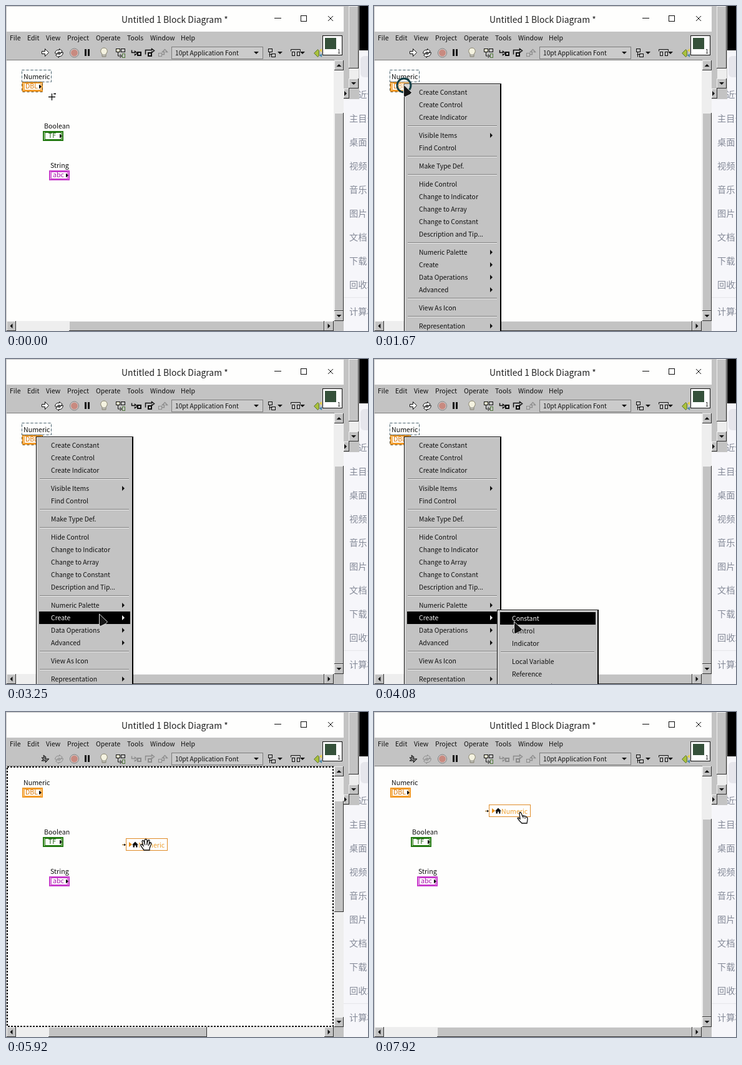
Write an HTML page with a canvas that moves like this. It is 580 by 520 pixels and loops after 8 s.

```html
<!DOCTYPE html>
<html lang="en">
<head>
<meta charset="utf-8">
<title>Block diagram demo</title>
<style>
html, body { margin: 0; width: 100%; height: 100%; overflow: hidden; background: #fefefd; }
canvas { display: block; }
</style>
</head>
<body>
<canvas id="stage" width="580" height="520"></canvas>
<script>
const ctx = document.getElementById('stage').getContext('2d');
const LOOP = 8000, STEP = 1000 / 12;
const PAPER = '#fefefd', FACE = '#c3c3c3', LIGHT = '#f0f0f0', TRACK = '#eeeeee';
const SHADE = '#7c7c7c', INK = '#101010', FADED = '#8c8c8c';
const SANS = '"Noto Sans CJK SC", "Noto Sans CJK", "Noto Sans", sans-serif';

// Moments at which the scene changes
const MENU_OPEN = 1500, SUBMENU_OPEN = 3420, PICKED = 5080, DROPPED = 6420;
const CLICKS = [1420, PICKED, DROPPED];

// Cursor path: time, x, y
const ROUTE = [
  [300, 73, 145], [1250, 48, 127], [1750, 48, 127], [2500, 143, 234], [2600, 143, 234],
  [3330, 150, 415], [3500, 150, 415], [4080, 225, 421], [4250, 225, 421], [4920, 261, 484],
  [5250, 261, 484], [6150, 217, 158], [6700, 217, 158], [7450, 226, 193], [7900, 235, 157]
];

const MENU = ['Create Constant', 'Create Control', 'Create Indicator', '-', 'Visible Items>', 'Find Control', '-',
  'Make Type Def.', '-', 'Hide Control', 'Change to Indicator', 'Change to Array', 'Change to Constant',
  'Description and Tip...', '-', 'Numeric Palette>', 'Create>', 'Data Operations>', 'Advanced>', '-',
  'View As Icon', '-', 'Representation>', 'Data Type'];
const SUBMENU = ['Constant', 'Control', 'Indicator', '-', 'Local Variable', 'Reference', 'Property Node>'];

function box(x, y, w, h, color) {
  ctx.fillStyle = color;
  ctx.fillRect(x, y, w, h);
}

function frame(x, y, w, h, color, line = 1) {
  ctx.strokeStyle = color;
  ctx.lineWidth = line;
  ctx.strokeRect(x + line / 2, y + line / 2, w - line, h - line);
}

function text(s, x, y, size = 10.4, color = INK, font = SANS) {
  ctx.font = `${size}px ${font}`;
  ctx.fillStyle = color;
  ctx.fillText(s, x, y);
}

function shape(d, x, y, fill, stroke, line = 1) {
  const path = new Path2D(d);
  ctx.save();
  ctx.translate(x, y);
  if (fill) { ctx.fillStyle = fill; ctx.fill(path); }
  if (stroke) { ctx.strokeStyle = stroke; ctx.lineWidth = line; ctx.stroke(path); }
  ctx.restore();
}

function circle(x, y, r, fill, stroke, line) {
  shape(`M${r} 0A${r} ${r} 0 1 1 ${-r} 0A${r} ${r} 0 1 1 ${r} 0Z`, x, y, fill, stroke, line);
}

function dashed(x, y, w, h, color, pattern, line = 1) {
  ctx.save();
  ctx.setLineDash(pattern);
  frame(x, y, w, h, color, line);
  ctx.restore();
}

function raised(x, y, w, h) {
  box(x, y, w, h, FACE);
  box(x, y, w, 1, LIGHT);
  box(x, y, 1, h, LIGHT);
  box(x, y + h - 1, w, 1, '#303030');
  box(x + w - 1, y, 1, h, '#303030');
}

const TRIANGLES = {
  up: 'M-4 2L0 -2L4 2Z', down: 'M-4 -2L0 2L4 -2Z', left: 'M2 -4L-2 0L2 4Z', right: 'M-2 -4L2 0L-2 4Z'
};

function arrowButton(x, y, dir, size = 15) {
  raised(x, y, size, 16);
  shape(TRIANGLES[dir], x + size / 2, y + 8, INK);
}

function desktop() {
  box(0, 0, 580, 520, PAPER);
  box(541, 0, 39, 520, '#f6f6fa');
  ['最近使用', '主目录', '桌面', '视频', '音乐', '图片', '文档', '下载', '回收站', '计算机'].forEach((s, i) =>
    text(s, 550, i < 9 ? 147 + i * 38 : 494, 14.2, '#858a98'));
  box(541, 466, 39, 1, '#e6e6ea');
  box(566, 0, 14, 71, '#000');
  ctx.fillStyle = '#e6e6ec';
  ctx.beginPath();
  ctx.roundRect(568, 80, 30, 34, 6);
  ctx.fill();
  // Corner of a window further back
  box(541, 0, 25, 149, FACE);
  raised(549, 0, 16, 100);
  box(550, 100, 15, 16, TRACK);
  arrowButton(549, 116, 'down', 16);
  raised(541, 132, 9, 16);
  shape(TRIANGLES.right, 544, 140, INK);
}

function windowChrome(broken) {
  box(0, 0, 541, 520, PAPER);
  box(0, 0, 541, 1, '#c4c4c4');
  box(0, 0, 1, 520, '#c4c4c4');
  text('Untitled 1 Block Diagram *', 185, 27, 13.9, '#202020');
  box(430, 19, 11, 1, INK);
  frame(472, 15, 10, 10, INK);
  shape('M0 0L8 8M8 0L0 8', 516, 16, null, INK);

  box(1, 41, 540, 46, FACE);
  box(1, 86, 525, 1, SHADE);
  [['File', 6], ['Edit', 34], ['View', 64], ['Project', 98], ['Operate', 144], ['Tools', 194], ['Window', 231], ['Help', 280]]
    .forEach(([s, x]) => text(s, x, 55, 10.5));
  toolbar(broken);
}

function toolbar(broken) {
  const live = broken ? FADED : INK;
  const cell = broken ? FACE : PAPER;
  if (broken) {
    shape('M0 4H4L3 0L7 3L6 6L12 6L6 12L7 9H0L3 7Z', 57, 69, '#808080', INK);
  } else {
    shape('M0 4H5V0L11 6L5 12V8H0Z', 57.5, 68.5, PAPER, INK);
  }
  shape('M0 6Q1 0 7 1V-1L12 3L7 6V4Q4 4 3 7Z', 78.5, 69.5, cell, live);
  shape('M13 5Q12 12 6 11V13L1 9L6 6V8Q9 8 10 5Z', 78.5, 69.5, cell, live);
  circle(109.5, 75, 7, '#d8d0d0', SHADE);
  circle(109.5, 75, 5.5, '#c88a80');
  box(126, 69, 3, 11, INK);
  box(131, 69, 3, 11, INK);
  shape('M-3 5Q-3 3 -5 1A5.3 5.3 0 1 1 5 1Q3 3 3 5V8H-3Z', 157, 73, '#f4f2e0', '#8a8670');
  shape('M-3 5H3M-3 7H3', 157, 73, null, SHADE);

  frame(176, 68, 7, 6, INK);
  frame(184, 68, 7, 6, INK);
  box(177, 69, 5, 4, '#f3efd0');
  shape('M3 6V12H8M6 9L9 12L6 15', 176.5, 68, null, INK);
  frame(186, 76, 5, 7, '#50783c');

  shape('M0 0V4H5V2L9 5L5 8V6', 201.5, 70.5, null, live, 1.5);
  frame(210, 73, 7, 7, live, 2);
  shape('M0 8V1H10V-1L14 2L10 5V3', 223.5, 69.5, null, live, 1.5);
  frame(227, 74, 7, 7, live, 2);
  shape('M6 6H10V2H7L11 -2L15 2H12', 243.5, 71.5, null, FADED, 1.3);
  frame(244, 75, 6, 6, FADED);

  box(265, 65, 147, 20, '#cbcbcb');
  frame(265, 65, 147, 20, SHADE);
  text('10pt Application Font', 271, 79, 10.2);
  shape(TRIANGLES.down, 401, 75, INK);

  frame(420, 68, 7, 6, INK);
  frame(425, 76, 7, 6, INK);
  shape('M1 6V14M0 10H5', 421.5, 67.5, null, INK);
  shape(TRIANGLES.down, 439, 75, INK);
  shape('M0 3V0H15V3', 456.5, 69.5, null, INK);
  frame(458, 73, 5, 7, INK);
  frame(466, 73, 5, 7, INK);
  shape(TRIANGLES.down, 475, 75, INK);
  shape('M0 6L6 0L8 2V10L6 12Z', 493.5, 69.5, '#a9bf3c', '#56703a');
  shape('M0 0L4 -3V3Z', 502, 71, '#e4cc40');
  shape('M0 0L4 -3V3Z', 502, 79, '#4484a8');

  box(507, 47, 32, 32, '#fff');
  frame(507, 47, 32, 32, INK);
  box(511, 51, 18, 18, '#35513a');
  text('1', 531, 76, 9);
}

function scrollbars(dragging) {
  box(525, 87, 16, 433, TRACK);
  box(1, 504, 540, 16, TRACK);
  arrowButton(526, 87, 'up');
  arrowButton(526, 488, 'down');
  arrowButton(1, 504, 'left');
  arrowButton(510, 504, 'right');
  box(525, 504, 16, 16, FACE);
  if (dragging) {
    raised(526, 142, 15, 178);
    raised(68, 504, 254, 16);
  } else {
    raised(526, 171, 15, 317);
    raised(101, 504, 409, 16);
  }
}

function terminal(label, type, x, y, color, tint, ink) {
  text(label, x + 2, y - 4, 10.7);
  box(x, y, 33, 16, color);
  box(x + 2, y + 2, 29, 12, tint);
  frame(x + 3, y + 2, 27, 12, color);
  box(x + 4, y + 3, 25, 10, PAPER);
  ctx.textAlign = 'center';
  text(type, x + 15, y + 11, 8.5, ink, 'bold "DejaVu Serif", serif');
  ctx.textAlign = 'left';
  shape('M0 0L4 3.5L0 7Z', x + 27, y + 4.5, INK);
}

function selection() {
  frame(25, 102, 48, 20, '#e2e6e8');
  dashed(25, 102, 48, 20, '#46606c', [4, 3]);
  dashed(25, 121, 34, 17, '#685838', [4, 3]);
}

function localVariable(x, y) {
  box(x, y, 67, 20, PAPER);
  frame(x, y, 67, 20, '#e08c28');
  box(x - 6, y + 10, 6, 1, '#a06810');
  shape('M-2 -2L1 0L-2 2Z', x - 1, y + 10.5, INK);
  shape('M0 0L5 4L0 8Z', x + 5, y + 6, '#e88c10');
  shape('M0 5L5 0L10 5H8.5V9H6V6H4V9H1.5V5Z', x + 10, y + 5.5, INK);
  text('Numeric', x + 20, y + 14.5, 10.6, '#eea030');
}

function popup(x, y, w, items, selected) {
  box(x - 1, y, w + 2, 520 - y, '#000');
  box(x, y + 1, w - 1, 520 - y, FACE);
  box(x, y + 1, w - 1, 1, LIGHT);
  box(x, y + 1, 1, 520 - y, LIGHT);
  let row = y + 14;
  for (const item of items) {
    if (item === '-') {
      box(x + 5, row - 7, w - 11, 1, SHADE);
      box(x + 5, row - 6, w - 11, 1, LIGHT);
      row += 9;
      continue;
    }
    const name = item.replace('>', '');
    const active = selected(name, row);
    const color = active ? '#f4f4f4' : INK;
    if (active) box(x + 4, row - 10, w - 8, 20, '#000');
    text(name, x + 23, row + 4, 10.4, color);
    if (item !== name) shape(TRIANGLES.right, x + w - 15, row, color);
    row += 20;
  }
}

function cursorAt(t) {
  const i = ROUTE.findIndex(p => p[0] > t);
  if (i < 0) return ROUTE.at(-1).slice(1);
  if (i === 0) return ROUTE[0].slice(1);
  const [t0, x0, y0] = ROUTE[i - 1], [t1, x1, y1] = ROUTE[i];
  const k = (t - t0) / (t1 - t0), ease = k * k * (3 - 2 * k);
  return [x0 + (x1 - x0) * ease, y0 + (y1 - y0) * ease].map(Math.round);
}

function clickRing(t, x, y) {
  const age = Math.min(...CLICKS.filter(c => c <= t).map(c => t - c));
  if (age < 340) circle(x, y, 6 + 5 * Math.min(1, age / 180), 'rgba(255,255,255,.3)', '#123f46', 3);
}

function cursor(t, x, y) {
  if (t < 1250) {
    shape('M-5 .5H6M.5 -5V6', x, y, null, INK, 1.3);
    shape('M3 -4.5H7M5.5 -6V-3', x, y, null, INK);
  } else if (t < PICKED) {
    shape('M-.5 -1L12.5 11.5L10 14.5L1.5 18.5L-.5 17Z', x, y, '#161616', '#e4e4e4');
  } else if (t < DROPPED) {
    shape('M-3 9L-8 2Q-9 -1 -6 0L-4 2L-6 -5Q-5 -8 -3 -5L-2 -2V-7Q0 -10 2 -7V-2L4 -7Q6 -8 6 -5L5 0L7 -3Q10 -3 8 1L6 6V9Z',
      x, y, '#fff', INK, 1.3);
    shape('M-2 -2L-1 1M2 -2V1M5 0L4 2', x, y, null, INK);
  } else {
    shape('M-2 5Q-1 2 1 5L3 10Q5 8 6 10Q8 9 9 11Q11 11 11 15L10 21H2L-2 17L-5 13Q-4 11 -1 14Z',
      x, y, '#fff', INK, 1.3);
    shape('M4 10V13M7 11V14', x, y, null, INK);
  }
}

function draw(t) {
  const [x, y] = cursorAt(t);
  const picked = t >= PICKED, dragging = picked && t < DROPPED;
  desktop();
  windowChrome(picked);
  scrollbars(dragging);
  if (dragging) dashed(1, 87, 524, 417, INK, [3, 2], 2);

  terminal('Numeric', 'DBL', 26, 121, '#f29a28', '#ffe0b0', '#d87400');
  terminal('Boolean', 'TF', 59, 200, '#237a12', '#d4e4c4', '#1c5c10');
  terminal('String', 'abc', 69, 263, '#c83ccc', '#f6c8f2', '#a818ac');

  if (!picked) selection();
  else if (dragging) localVariable(x - 32, y - 10);
  else localVariable(184, 148);

  if (t >= MENU_OPEN && !picked) {
    const submenu = t >= SUBMENU_OPEN;
    const hovered = row => x > 52 && y >= row - 10 && y < row + 10;
    popup(49, 124, 154, MENU, (name, row) => submenu ? name === 'Create' : hovered(row));
    if (submenu) popup(198, 401, 161, SUBMENU, (name, row) => x > 202 && hovered(row));
  }
  clickRing(t, x, y);
  cursor(t, x, y);
}

function tick(now) {
  const t = now % LOOP;
  draw(Math.floor((t + 5) / STEP) * STEP % LOOP);
  requestAnimationFrame(tick);
}
requestAnimationFrame(tick);
</script>
</body>
</html>
```
